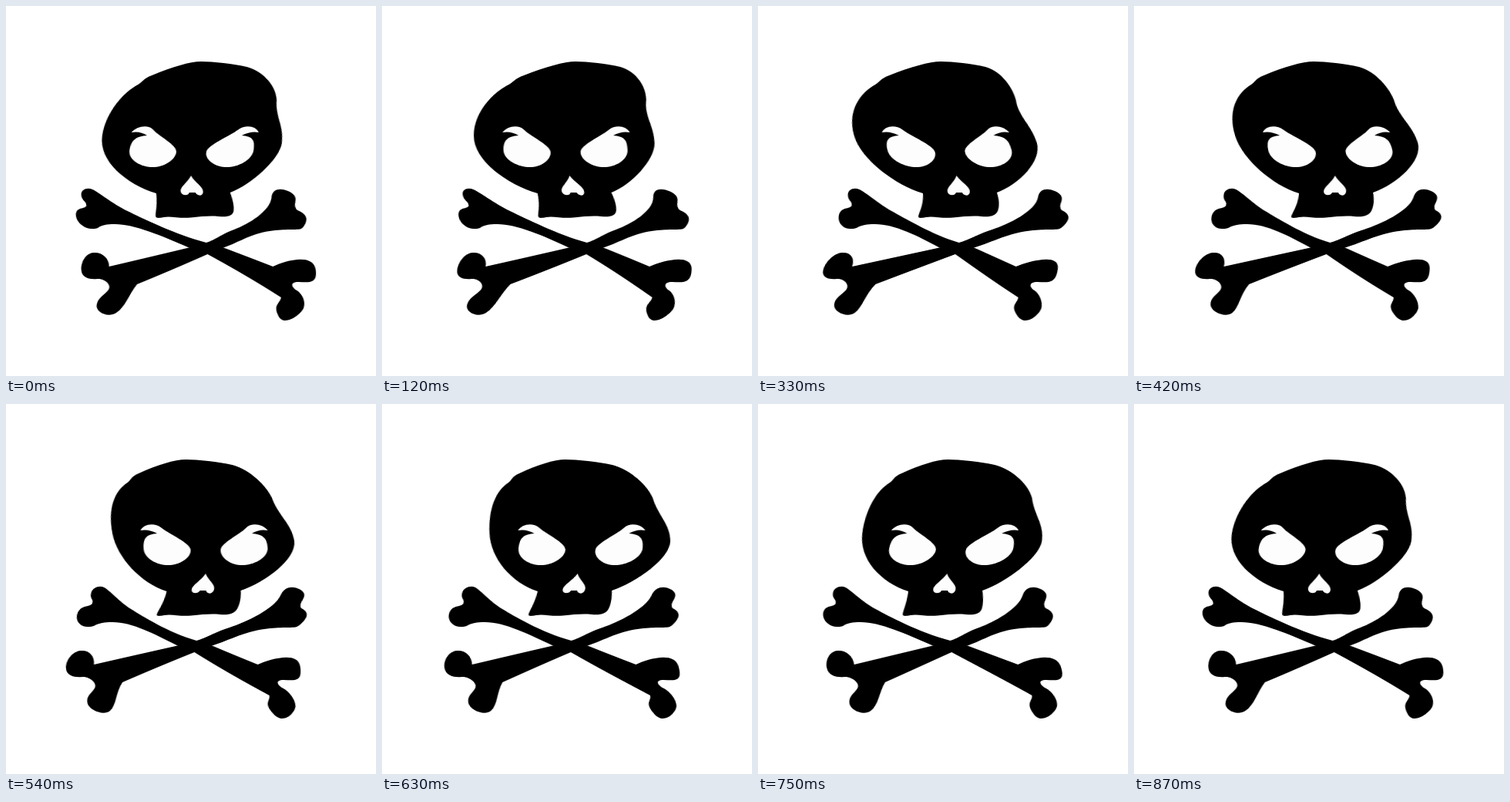
An HTML page with a canvas that plays this animation: 480x480 px, repeating every 900 ms.

```html
<!DOCTYPE html>
<html>
<head>
<meta charset="utf-8">
<style>
  html, body { margin: 0; height: 100%; overflow: hidden; background: #fff; }
  canvas { display: block; }
</style>
</head>
<body>
<canvas id="stage" width="480" height="480"></canvas>
<script>
const SIZE = 480, LOOP = 900, STEP = 30;
const AMPLITUDE = 10.5, WAVELENGTH = 281, CREST_ROW = 360;
const EYE_AXIS = 248.5;

const skull = `M204 243 C168 232 131 200 129 168 S144 112 162 102 C167 99 168 94 179 90
  C205 79 228 72 243 72 S285 75 302 79 S340 101 345 122 C347 143 363 156 364 178
  S330 231 300 242 C302 250 303 258 301 265 S292 274 280 273 S258 273 243 274.5
  S218 272 208 274 S197 275 199 269 S204 254 204 243Z`;
const eye = `M166 164 C171 156 185 153 194 161 S228 180 229 189 S218 208 203 209
  S168 201 168 187 S174 169 187 168 Q177 162 166 164Z`;
const nose = `M250.5 220 C255 229 266 234 265 241 S256 246 255 242 H247
  C246 246 237 247 236 241 S246 229 250.5 220Z`;
const fallingBone = `M111 257 C111 253 106 252 106.5 245 S115 235 122 238 S146 257 163 266
  S217 296 256 307 L277 313.5 337 338 C353 331 390 320 392 341 S381 358 369 358
  S360 365 367 369 S380 384 378 392 S357 417 347 402 S347 386 347 378
  L254.6 322 232 313.5 C200 298 168 283 143 283 S124 290 111 289 S92 276 96 268 S112 264 111 257Z`;
const risingBone = `M382 262 C380 257 386 252 383 246 S357 230 353 248 S316 283 296 290
  S269 303 256 307 L232 313.5 124.5 338 C126 327 118 319 107 320 S88 333 88 343
  S99 355 108 354 S128 362 122 369 S109 379 109 388 S126 405 136 398 S149 374 159.5 361
  L254.6 322 277 313.5 C300 306 318 294 349 291 S381 293 388 285 S394 272 389 268 S383 266 382 262Z`;

const emblem = document.createElement("canvas");
emblem.width = emblem.height = SIZE;
const pen = emblem.getContext("2d");
const paint = (color, ...outlines) => {
  pen.fillStyle = color;
  outlines.forEach(outline => pen.fill(new Path2D(outline)));
};
paint("#000", skull, fallingBone, risingBone);
paint("#fdfdfd", eye, nose);
pen.setTransform(-1, 0, 0, 1, 2 * EYE_AXIS, 0);
paint("#fdfdfd", eye);

const ctx = document.getElementById("stage").getContext("2d");
const sway = (y, t) =>
  AMPLITUDE * Math.cos(2 * Math.PI * (t / LOOP + (y - CREST_ROW) / WAVELENGTH));

// Each pixel row slides sideways on a travelling wave.
function draw(now) {
  const t = Math.floor((now % LOOP) / STEP) * STEP;
  ctx.clearRect(0, 0, SIZE, SIZE);
  for (let y = 0; y < SIZE; y++) {
    ctx.drawImage(emblem, 0, y, SIZE, 1, sway(y, t), y, SIZE, 1);
  }
  requestAnimationFrame(draw);
}
requestAnimationFrame(draw);
</script>
</body>
</html>
```
